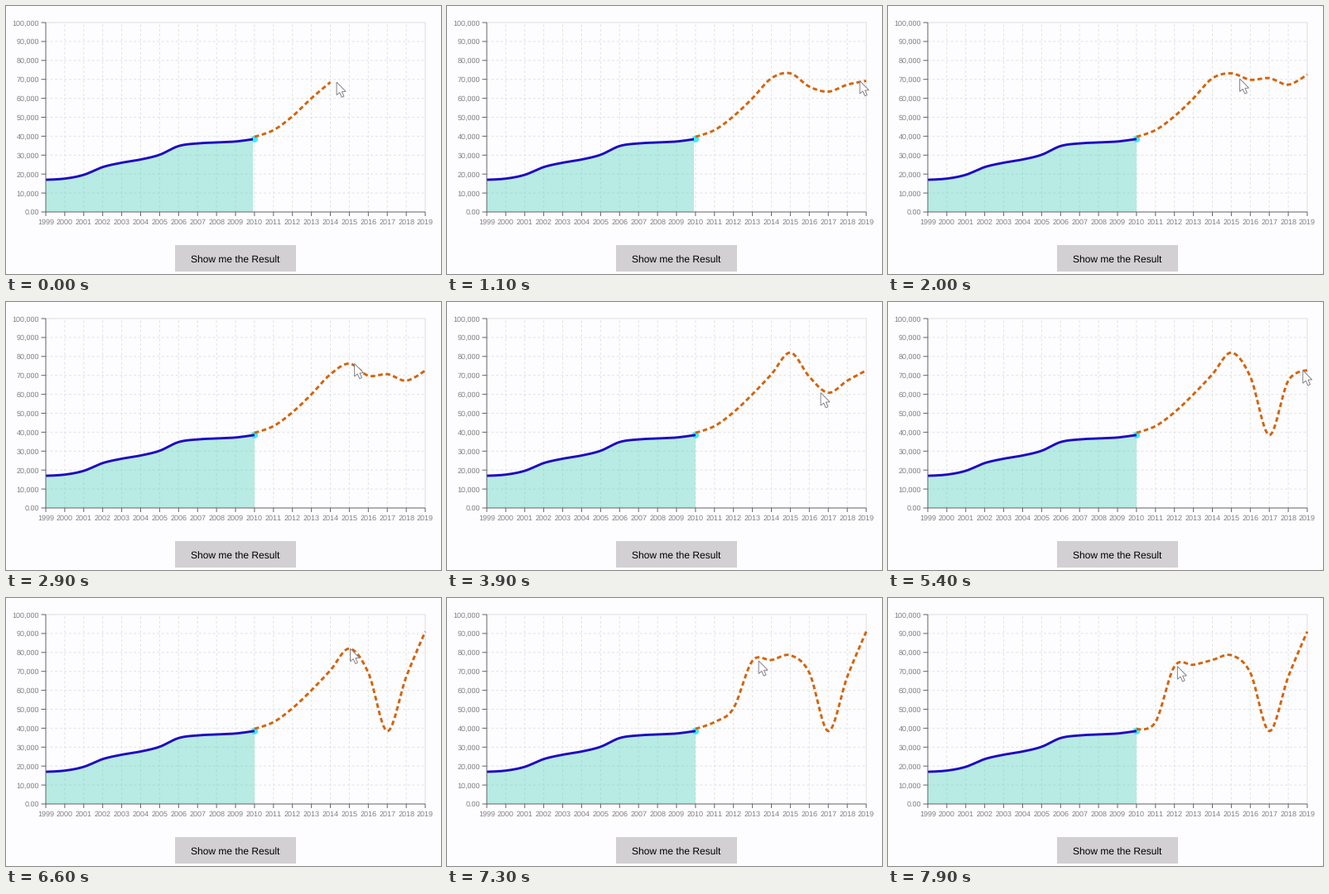
Write a matplotlib script that moves like this. It is 525x324 px and loops after 8000 ms.

```python
import numpy as np
import matplotlib.pyplot as plt
from matplotlib.animation import FuncAnimation
from matplotlib.patches import Circle, Polygon, Rectangle

plt.rcParams.update({"text.hinting": "none", "text.hinting_factor": 1,
                     "font.family": "Liberation Sans"})

W, H, DPI = 525, 324, 100
FRAMES, INTERVAL = 80, 100
PX = 72 / DPI                      # points per pixel
LEFT, BASE = 48, 249
STEP = 22.9                        # one year, and also 10,000 units
RIGHT, TOP = LEFT + 20 * STEP, BASE - 10 * STEP

HISTORY = [17, 17.6, 19.6, 23.7, 26, 27.7, 30.2, 34.8, 36.2, 36.7, 37.2, 38.5]
GUESS_START = {2010: 39.7, 2011: 43.2, 2012: 50.5, 2013: 60}

# Key points of the pointer: time, year, value in thousands
PATH = np.array([
    (0, 2014.33, 68.5), (100, 2014.5, 70.8), (300, 2015.5, 73.3),
    (500, 2016.5, 65.8), (700, 2017.5, 63.4), (900, 2018.5, 67.4),
    (1100, 2018.66, 69.2), (1300, 2018.9, 72.6), (1900, 2015.5, 69.8),
    (2600, 2015.1, 73.5), (2900, 2015.27, 76.2), (3000, 2015.2, 82),
    (3200, 2015.5, 82), (3700, 2016.5, 69), (4500, 2016.9, 36.4),
    (4700, 2016.95, 38.5), (5400, 2018.77, 72.6), (5800, 2018.9, 91),
    (6400, 2015.05, 82), (6600, 2015.05, 82), (6900, 2014.5, 78.5),
    (7700, 2012.16, 72.6),
])
DRAGS = [(0, 1300), (1700, 1900), (2700, 4700), (5400, 5800), (6600, 7700)]
ARROW = np.array([(0, 0), (0, 15.5), (3.6, 12.4), (6.2, 18.2),
                  (8.8, 17), (6.3, 11.4), (11, 11.2)])


def to_xy(years, thousands):
    xs = LEFT + (np.asarray(years) - 1999) * STEP
    return np.column_stack([xs, BASE - np.asarray(thousands) * STEP / 10])


def cardinal(points, n=24):
    """Cardinal spline through points with flat (zero) end tangents."""
    tangents = np.zeros_like(points)
    tangents[1:-1] = (points[2:] - points[:-2]) / 2
    t = np.linspace(0, 1, n)[:, None]
    parts = []
    for p, q, m, k in zip(points, points[1:], tangents, tangents[1:]):
        parts.append((1 - t) ** 3 * p + 3 * t * (1 - t) ** 2 * (p + m / 3)
                     + 3 * t ** 2 * (1 - t) * (q - k / 3) + t ** 3 * q)
    return np.vstack(parts)


def pointer_at(time):
    return [np.interp(time, PATH[:, 0], PATH[:, k]) for k in (1, 2)]


def guess_curve(now):
    """Replay the drags: the year nearest the pointer takes its height."""
    guess = dict(GUESS_START)
    for start, end in DRAGS:
        for time in range(start, min(now, end) + 1, 10):
            year, value = pointer_at(time)
            guess[int(year + 0.5)] = value
    years = sorted(guess)
    return cardinal(to_xy(years, [guess[y] for y in years]))


fig = plt.figure(figsize=(W / DPI, H / DPI), dpi=DPI, facecolor="#fdfcfe")
ax = fig.add_axes([0, 0, 1, 1])
ax.set(xlim=(0, W), ylim=(H, 0))
ax.axis("off")


def line(xs, ys, color, width=1, z=1, dash=None):
    style = (0, [d / width for d in dash]) if dash else "-"
    return ax.plot(xs, ys, color=color, lw=width * PX, ls=style, zorder=z,
                   snap=False, solid_capstyle="butt",
                   dash_capstyle="butt")[0]


def label(x, y, text, align, size=9.3, color="#808080"):
    ax.text(x, y, text, ha=align, va="baseline", fontsize=size * PX,
            color=color)


GRID, EDGE, AXIS = "#dfe6de", "#dededf", "#666666"
for i in range(11):
    y = BASE - i * STEP
    if 0 < i < 10:
        line([LEFT, RIGHT], [y, y], GRID, dash=(2.8, 2.8))
    line([LEFT - 5.5, LEFT], [y, y], AXIS, z=6)
    label(40, y + 3.4, f"{i * 10000:,}" if i else "0.00", "right")
for i in range(21):
    x = LEFT + i * STEP
    if 0 < i < 20:
        line([x, x], [BASE, TOP], GRID, dash=(2.8, 2.8))
    line([x, x], [BASE, BASE + 5], AXIS, z=6)
    label(x, 263.7, str(1999 + i), "center")
line([LEFT, RIGHT, RIGHT], [TOP, TOP, BASE], EDGE)
line([LEFT, LEFT, RIGHT], [TOP, BASE, BASE], AXIS, z=6)

ax.add_patch(Rectangle((204, 289), 146, 32, fc="#d2d0d3", lw=0))
label(277, 309.6, "Show me the Result", "center", 12.27, "black")

history = cardinal(to_xy(range(1999, 2011), HISTORY))
area = ax.add_patch(Polygon(
    np.vstack([history, (history[-1, 0], BASE), (LEFT, BASE)]),
    fc="#50d2bd", alpha=0.4, lw=0, zorder=2))
ax.add_patch(Circle(history[-1], 4.2, fc="#3feeee", lw=0, zorder=3))
blue = line(*history.T, "#1f08bf", 2.9, z=4)
reveal = Rectangle((0, 0), 298, H, transform=ax.transData)
orange = line([], [], "#d2640c", 2.9, z=5, dash=(5.6, 3.6))
pointer = ax.add_patch(Polygon(ARROW, fc="white", ec="#87858a", lw=PX,
                               joinstyle="miter", zorder=9))


def update(frame):
    time = frame * INTERVAL
    reveal.set_width(298 if time < 1400 else 301)
    for part in (area, blue):
        part.set_clip_path(reveal)
    orange.set_data(*guess_curve(time).T)
    pointer.set_xy(ARROW + to_xy(*pointer_at(time)))
    return orange, pointer, area, blue


anim = FuncAnimation(fig, update, frames=FRAMES, interval=INTERVAL,
                     repeat=True, repeat_delay=0, blit=False)
plt.show()
```
